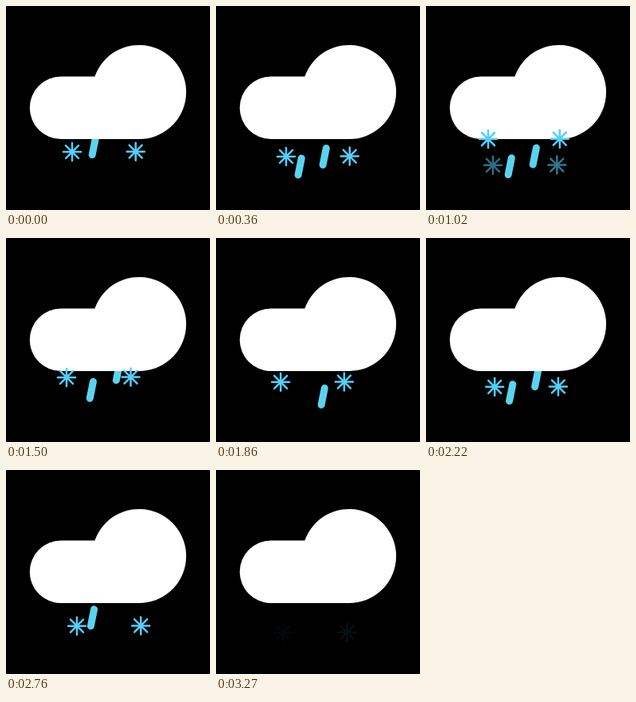
Write an HTML page that moves like this. It is 256x256 px and loops after 3300 ms.

```html
<!DOCTYPE html>
<html>
<head>
<meta charset="utf-8">
<title>Sleet</title>
<style>
html, body { margin: 0; width: 100%; height: 100%; overflow: hidden; background: #000; }
svg { display: block; width: 100%; height: 100%; }
.drop { stroke: #5bd3ef; stroke-width: 9; stroke-linecap: round; }
.flake { stroke: #52cffc; stroke-width: 2.5; stroke-linecap: round; }
</style>
</head>
<body>
<svg viewBox="0 0 256 256">
  <defs>
    <path id="flake" class="flake" d="M-11 0H11M0-11V11M-8-8L8 8M-8 8L8-8"/>
  </defs>
  <path class="drop" d="M0 0L4.2-21"/>
  <path class="drop" d="M0 0L4.2-21"/>
  <path fill="#fff" d="M69 88.5H111.4A59 59 0 1 1 167 167H69A39.25 39.25 0 0 1 69 88.5Z"/>
  <use class="snow" href="#flake"/>
  <use class="snow" href="#flake"/>
  <use class="snow" href="#flake"/>
  <use class="snow" href="#flake"/>
</svg>
<script>
const LOOP = 3300, SNOW_GAP = 1990;
const DROP_CYCLE = 667, DROP_TIME = 460;
const SNOW_START = 960, SNOW_END = 3290;
const drops = document.querySelectorAll('.drop');
const flakes = document.querySelectorAll('.snow');

// sideways drift as [time, x]
const endDrift = [[1500, 76], [1990, 83], [2350, 88], [2540, 91], [2760, 89], [3010, 84], [3290, 84.5]];
const drift = [
  [[960, 74], [1020, 78], [1090, 80], ...endDrift],
  [[960, 88], [1080, 87.5], ...endDrift]
];

function sample(points, t) {
  let i = 1;
  while (i < points.length - 1 && points[i][0] < t) i++;
  const [t0, x0] = points[i - 1], [t1, x1] = points[i];
  return x0 + (x1 - x0) * (t - t0) / (t1 - t0);
}

function place(el, x, y, opacity) {
  el.setAttribute('transform', `translate(${x} ${y})`);
  el.setAttribute('opacity', opacity);
}

function drawDrop(el, side, t) {
  const age = t - (side ? 130 : -90);
  const p = (age % DROP_CYCLE) / DROP_TIME;
  const visible = age >= 0 && p < 1 && t < 3240;
  const y = 160.5 + 52 * Math.max(0, p) ** 0.42;
  place(el, 107.5 + side * 28.5 - 0.2 * (y - 190), y, visible ? 1 : 0);
}

function drawFlake(el, side, t) {
  const u = t - side * 20;
  const visible = t >= SNOW_START && u < SNOW_END;
  const fade = Math.min(1, (SNOW_END - u) / 520);
  const y = 166 + Math.max(0, u - SNOW_START) * 0.0165;
  place(el, sample(drift[side], u) + side * 80, y, visible ? fade : 0);
}

function draw(now) {
  const t = now % LOOP;
  drops.forEach((el, i) => drawDrop(el, i, t));
  flakes.forEach((el, i) => drawFlake(el, i % 2, t + (i < 2 ? SNOW_GAP : 0)));
}

const start = performance.now();
function tick() {
  draw(performance.now() - start);
  requestAnimationFrame(tick);
}
tick();
</script>
</body>
</html>
```
